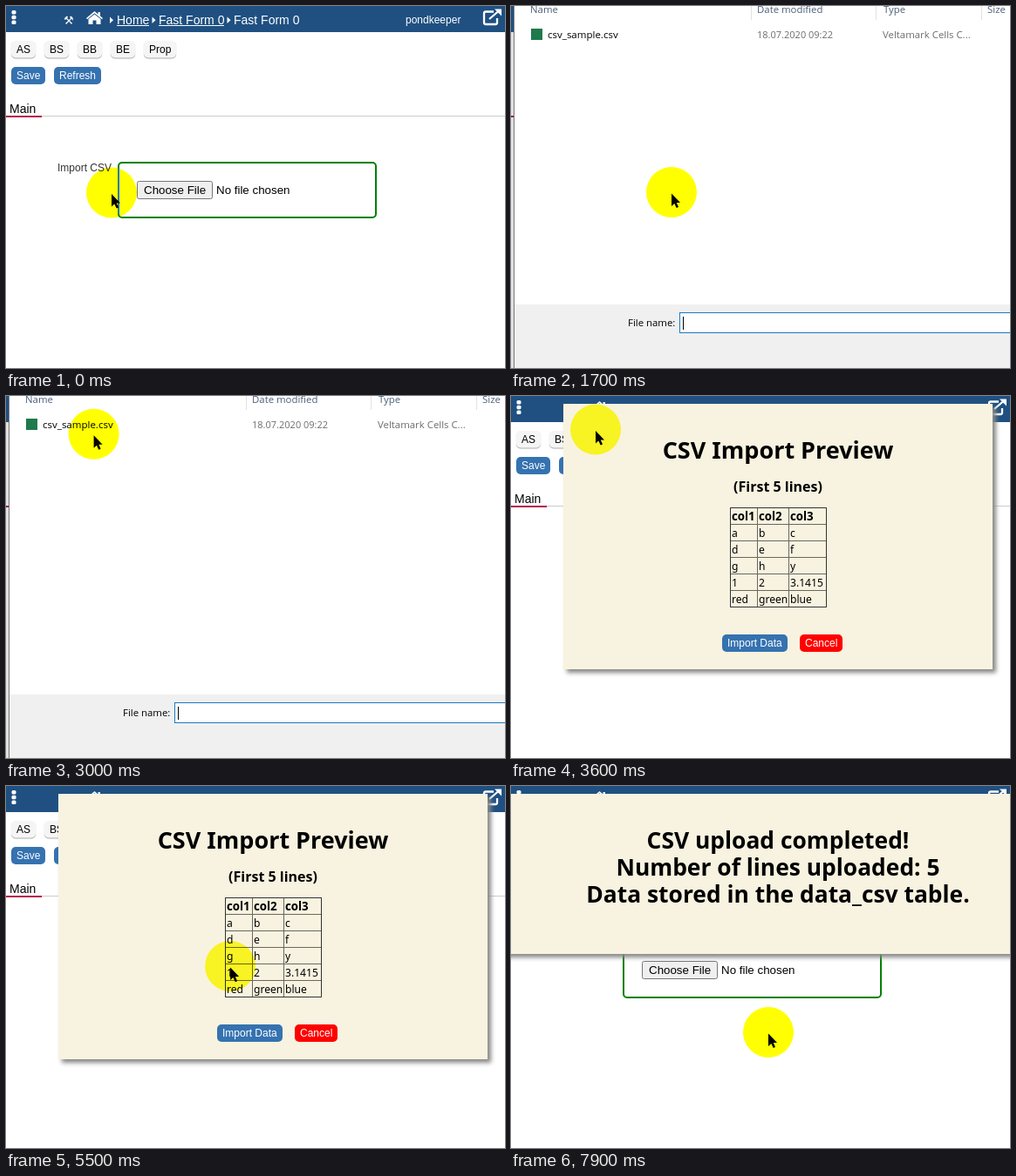
An HTML page with a canvas that plays this animation: 572x416 px, repeating every 8000 ms.

```html
<!DOCTYPE html>
<html lang="en">
<head>
<meta charset="utf-8">
<title>CSV import</title>
<style>
  html, body { margin: 0; width: 100%; height: 100%; overflow: hidden; background: #fff; }
  canvas { display: block; }
</style>
</head>
<body>
<canvas id="stage" width="572" height="416"></canvas>
<script>
const ctx = document.getElementById('stage').getContext('2d');
const LOOP = 8000, STEP = 100;
const ARIAL = '"Liberation Sans", Arial, sans-serif';
const NOTO = '"Noto Sans", sans-serif';
const OPEN = '"Open Sans", sans-serif';
const BLUE = '#3572b0', CREAM = '#f8f3e0';

function text(str, x, y, size, color = '#000', family = ARIAL, weight = 'normal', align = 'left') {
  ctx.font = `${weight} ${size}px ${family}`;
  ctx.textAlign = align;
  ctx.fillStyle = color;
  ctx.fillText(str, x, y);
}

function rect(x, y, w, h, color) {
  ctx.fillStyle = color;
  ctx.fillRect(x, y, w, h);
}

function rounded(x, y, w, h, r, fill, stroke, line = 1) {
  ctx.beginPath();
  ctx.roundRect(x, y, w, h, r);
  if (fill) { ctx.fillStyle = fill; ctx.fill(); }
  if (stroke) { ctx.strokeStyle = stroke; ctx.lineWidth = line; ctx.stroke(); }
}

function disc(x, y, r, color) {
  ctx.beginPath();
  ctx.arc(x, y, r, 0, Math.PI * 2);
  ctx.fillStyle = color;
  ctx.fill();
}

function polygon(points, color) {
  ctx.beginPath();
  points.forEach(([x, y]) => ctx.lineTo(x, y));
  ctx.closePath();
  ctx.fillStyle = color;
  ctx.fill();
}

function withShadow(x, y, blur, color, draw) {
  ctx.save();
  ctx.shadowOffsetX = x;
  ctx.shadowOffsetY = y;
  ctx.shadowBlur = blur;
  ctx.shadowColor = color;
  draw();
  ctx.restore();
}

function button(label, x, y, w, color) {
  rounded(x, y, w, 20, 5, color);
  text(label, x + 6, y + 14, 12, '#fff');
}

function drawHeader() {
  rect(0, 0, 572, 30, '#1f5081');
  for (const y of [5, 10.7, 16.4]) rounded(6.5, y, 5, 4.6, 1.5, '#fff');
  text('⚒', 66, 20.5, 13, '#fff', '"DejaVu Sans", sans-serif');

  // house
  polygon([[92, 14], [101.5, 6], [105.5, 9.4], [105.5, 7], [108, 7], [108, 11.4], [111, 14],
    [110, 15.2], [101.5, 8.2], [93, 15.2]], '#fff');
  polygon([[94.5, 15], [101.5, 9.4], [108.5, 15], [108.5, 21], [103.5, 21], [103.5, 16.5],
    [99.5, 16.5], [99.5, 21], [94.5, 21]], '#fff');

  for (const x of [119, 167.5, 253.5]) polygon([[x, 12.5], [x + 4, 16.2], [x, 20]], '#fff');
  text('Home', 127, 21, 14, '#fff');
  rect(127, 22, 37, 1, '#fff');
  text('Fast Form 0', 175, 21, 14, '#fff');
  rect(175, 22, 75, 1, '#fff');
  text('Fast Form 0', 261, 21, 14, '#fff');
  text('pondkeeper', 458, 20, 12, '#fff');

  // open in new window
  ctx.strokeStyle = '#fff';
  ctx.lineWidth = 2.3;
  ctx.beginPath();
  ctx.moveTo(559, 6.5);
  ctx.lineTo(550, 6.5);
  ctx.quadraticCurveTo(548, 6.5, 548, 8.5);
  ctx.lineTo(548, 19);
  ctx.quadraticCurveTo(548, 21, 550, 21);
  ctx.lineTo(561, 21);
  ctx.quadraticCurveTo(563, 21, 563, 19);
  ctx.lineTo(563, 14);
  ctx.moveTo(554, 15);
  ctx.lineTo(565, 5.5);
  ctx.stroke();
  polygon([[560, 3.5], [568, 3.5], [568, 11.5]], '#fff');
}

function drawPage(hover) {
  rect(0, 0, 572, 416, '#fff');
  drawHeader();

  [['AS', 6, 28], ['BS', 44, 28], ['BB', 82, 28], ['BE', 120, 28], ['Prop', 158, 37]].forEach(([label, x, w]) => {
    withShadow(0, 1, 1, '#aaa', () => rounded(x, 40, w, 19.5, 5, '#f5f5f5'));
    text(label, x + 6, 54, 12);
  });
  button('Save', 6, 70, 39, BLUE);
  button('Refresh', 55, 70, 54, BLUE);

  text('Main', 4, 123, 14);
  rect(41, 126, 531, 1, '#ccc');
  rect(0, 126, 41, 2, '#b5174b');

  text('Import CSV', 59, 190, 12, '#333');
  rounded(129, 180, 295, 63, 4, null, '#008000', 2);
  rounded(150.5, 201.5, 86, 20, 2, hover ? '#e5e5e5' : '#efefef', hover ? '#4f4f4f' : '#767676');
  text('Choose File', 158, 216, 13.33);
  text('No file chosen', 241, 216, 13.33);
}

function drawFileDialog(t, pos) {
  const selected = t >= 3200;
  rect(0, 30, 3, 386, 'rgba(0,0,0,0.12)');
  rect(3, 0, 1, 416, '#777');
  rect(4, 0, 568, 416, '#fff');

  const head = '#4c607a', grey = '#6d6d6d';
  for (const x of [275, 418, 539]) rect(x, 0, 1, 16, '#e2e2e2');
  text('Name', 22, 8, 11.4, head, OPEN);
  text('Date modified', 282, 8, 11.4, head, OPEN);
  text('Type', 427, 8, 11.4, head, OPEN);
  text('Size', 546, 8, 11.4, head, OPEN);

  if (pos.y < 43) rect(14, 22, 558, 21, selected ? '#cce8ff' : '#e5f3ff');
  rect(23, 26, 13, 13, '#1e7a4b');
  text('csv_sample.csv', 42, 37, 11.5, '#000', OPEN);
  text('18.07.2020 09:22', 282, 37, 11, grey, OPEN);
  text('Veltamark Cells C...', 426, 37, 11.4, grey, OPEN);

  rect(4, 343, 568, 73, '#f0f0f0');
  text('File name:', 134, 368, 11.4, '#000', OPEN);
  rect(193, 352, 379, 24, '#1a78c0');
  rect(194, 353, 378, 22, '#fff');
  if (selected) text('csv_sample.csv', 198, 368, 11.5, '#000', OPEN);
  else if ((t - 1600) % 1060 < 530) rect(197, 357, 1, 15, '#000');
}

function popup(x, w, h) {
  withShadow(4, 4, 5, '#888', () => rect(x, 9, w, h, CREAM));
}

function drawPreview() {
  popup(60, 492, 305);
  text('CSV Import Preview', 306, 72, 27, '#000', NOTO, 'bold', 'center');
  text('(First 5 lines)', 306, 110, 16, '#000', NOTO, 'bold', 'center');

  const cols = [251, 282, 318, 361];
  const rows = ['col1 col2 col3', 'a b c', 'd e f', 'g h y', '1 2 3.1415', 'red green blue'];
  for (let i = 0; i <= rows.length; i++) rect(251, 128 + i * 19, 111, 1, '#6b675e');
  for (const x of cols) rect(x, 128, 1, 115, '#6b675e');
  rounded(251.5, 128.5, 110, 114, 0, null, '#333');
  rows.forEach((row, i) => row.split(' ').forEach((cell, j) =>
    text(cell, cols[j] + 2, 143 + i * 19, i ? 12.1 : 13.3, '#000', NOTO, i ? 'normal' : 'bold')));

  button('Import Data', 242, 274, 75, BLUE);
  button('Cancel', 331, 274, 49, '#f00');
}

function drawResult() {
  popup(-10, 592, 184);
  ['CSV upload completed!', 'Number of lines uploaded: 5', 'Data stored in the data_csv table.']
    .forEach((line, i) => text(line, 306, 72 + i * 31, 26.4, '#000', NOTO, 'bold', 'center'));
}

function tooltip(label, x, y, w) {
  rounded(x + 0.5, y + 0.5, w - 1, 24, 0, '#fff', '#555');
  text(label, x + 8, y + 17, 11.6, '#575757', OPEN);
}

// Pointer moves: start, end, from, control point, to
const moves = [
  [100, 650, [121, 214.5], [152, 217], [184, 214]],
  [2200, 3100, [184, 214], [150, 115], [97, 38.5]],
  [4700, 5900, [97, 38.5], [231, 128], [295, 283]]
];

function pointerAt(t) {
  const [start, end, a, c, b] = moves.findLast(m => t >= m[0]) || moves[0];
  const u = Math.min(1, Math.max(0, (t - start) / (end - start)));
  const s = u * u * (3 - 2 * u);
  const mix = i => (1 - s) ** 2 * a[i] + 2 * s * (1 - s) * c[i] + s * s * b[i];
  return { x: mix(0), y: mix(1) };
}

function drawHalo({ x, y }, color) {
  ctx.save();
  ctx.globalCompositeOperation = 'multiply';
  disc(x, y, 29, color);
  ctx.restore();
  // the frame's left edge turns blue under the halo
  if (x - 29 < 130 && y > 184) {
    ctx.save();
    ctx.beginPath();
    ctx.arc(x, y, 29, 0, Math.PI * 2);
    ctx.clip();
    rect(128, 184, 2, 55, '#1a78b8');
    ctx.restore();
  }
}

function drawArrow({ x, y }) {
  const shape = [[0, 0], [0, 14.5], [3.3, 11.4], [5.7, 16.6], [8, 15.6], [5.7, 10.6], [10, 10.4]];
  polygon(shape.map(([dx, dy]) => [x + dx, y + 1.5 + dy]), '#000');
}

const within = (t, a, b) => t >= a && t < b;

function draw(t) {
  const pos = pointerAt(t);
  const preview = within(t, 3500, 7500);
  drawPage(t < 1600 && pos.x > 150);
  if (within(t, 1600, 3400)) drawFileDialog(t, pos);
  if (preview) drawPreview();
  if (t >= 7500) drawResult();

  if (within(t, 700, 1100)) tooltip('ID: csvupload', 194, 229, 87);
  if (within(t, 6500, 7500)) tooltip('ID: nubody', 305, 292, 75);
  drawHalo(pos, preview ? '#ffff28' : '#ff0');
  if (within(t, 700, 1000) || within(t, 3200, 3400) || within(t, 7400, 7600)) disc(pos.x, pos.y, 4.5, '#f00');
  drawArrow(pos);
}

const origin = performance.now();
function tick() {
  const t = (performance.now() - origin) % LOOP;
  draw(Math.floor(t / STEP) * STEP);
  requestAnimationFrame(tick);
}
tick();
</script>
</body>
</html>
```
